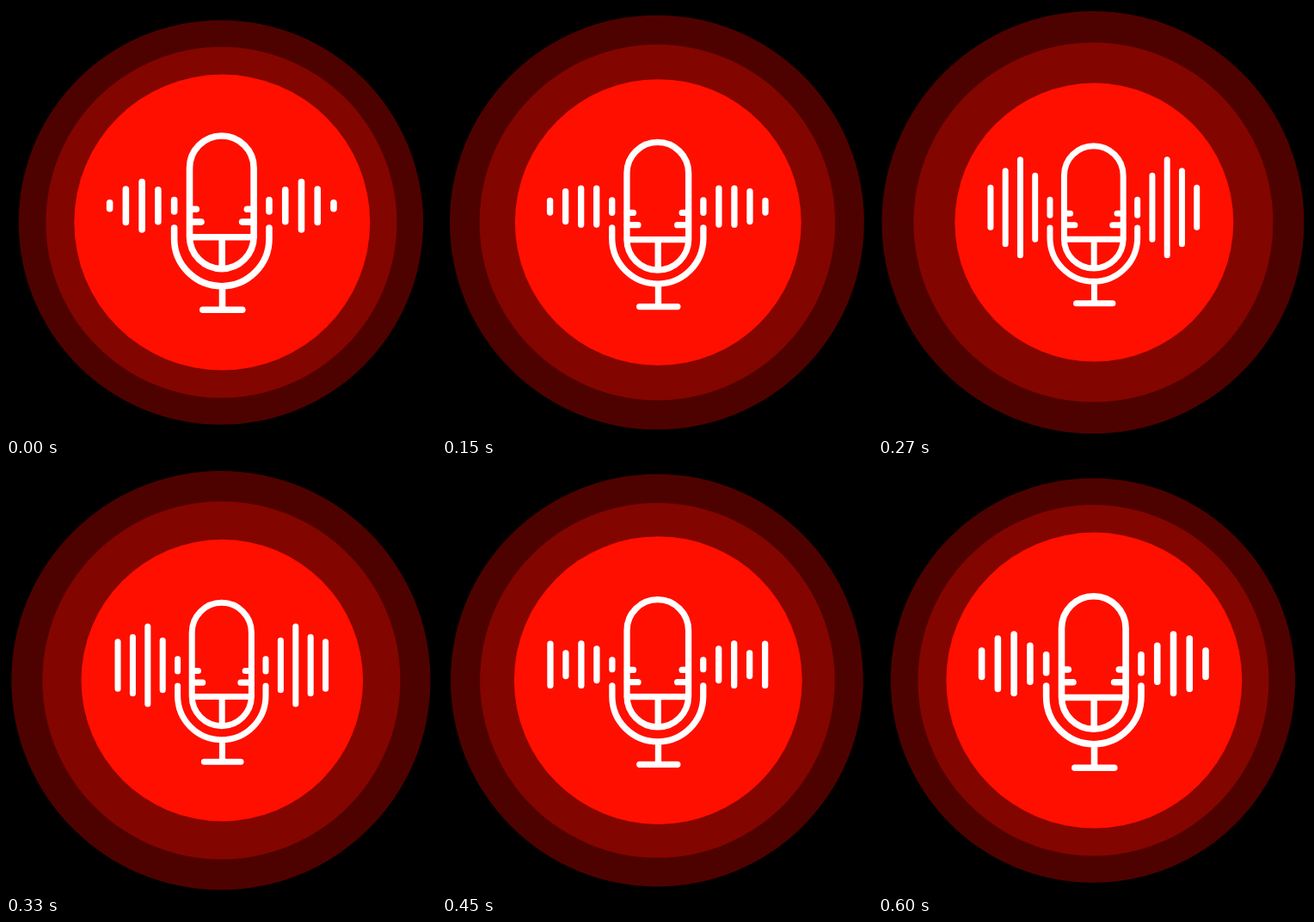
Recreate the animation shown at these times as an HTML page. Size 500 px wide and 500 px high, loop 630 ms.

```html
<!DOCTYPE html>
<html lang="en">
<head>
<meta charset="utf-8">
<title>Microphone pulse</title>
<style>
  html, body { margin: 0; width: 100%; height: 100%; overflow: hidden; background: #000; }
  svg { display: block; width: 100vw; height: 100vh; }
  .line { fill: none; stroke: #fff; stroke-width: 7.6; stroke-linecap: round; }
</style>
</head>
<body>
<svg viewBox="0 0 500 500">
  <circle id="outer" cx="249.9" cy="251.6" fill="#4e0200"/>
  <circle id="middle" cx="250.4" cy="251.6" fill="#830500"/>
  <circle id="inner" cx="251.3" cy="251.6" fill="#ff0f00"/>
  <!-- icon coordinates are relative to its scaling centre -->
  <g id="icon" class="line">
    <g id="bars"></g>
    <path d="M-55.2 1V13.5a55.2 55.2 0 0 0 110.4 0V1M.7 69V96M-22 96.3H24"/>
    <g id="capsule">
      <path d="M-37.3-66a37.3 37.3 0 0 1 74.6 0V14a37.3 37.3 0 0 1-74.6 0Z"/>
      <path d="M-37 14.5H37M.4 14.5V50"/>
      <path d="M-37-18H-29.5M-37-3.2H-23.8M37-18H29.5M37-3.2H23.8"/>
    </g>
  </g>
</svg>
<script>
const LOOP = 630, STEP = 30, PEAK = 270, END = 600;
const times = [0, 90, 210, 270, 390, 510, 600];
const shrink = [0, .21, .79, 1, .75, .27, 0];
const bounce = [-2.7, -.5, 1.4, .8, -.3, -.3, 0];
// bar lengths from the edge of the icon towards the microphone
const lengths = [
  [14.5, 23.5, 18.5, 53, 65, 43.5, 38],
  [46, 50.5, 34, 92, 46.5, 28, 66],
  [63, 39.5, 71, 118, 69, 49.5, 76],
  [44.5, 30.5, 73.5, 81, 46.5, 43, 49.5],
  [21, 16.5, 27, 25, 18.5, 18, 28.5]
];
const $ = id => document.getElementById(id);

const bars = lengths.map(() => {
  const path = document.createElementNS("http://www.w3.org/2000/svg", "path");
  return $("bars").appendChild(path);
});

function slope(v, i) {
  if (i === 0 || i === v.length - 1) {
    const j = i ? i - 1 : 0;
    return (v[j + 1] - v[j]) / (times[j + 1] - times[j]);
  }
  const a = (v[i] - v[i - 1]) / (times[i] - times[i - 1]);
  const b = (v[i + 1] - v[i]) / (times[i + 1] - times[i]);
  return a * b <= 0 ? 0 : 2 * a * b / (a + b);
}

// smooth curve through the keys, without overshoot
function curve(v, t) {
  if (t >= END) return v[v.length - 1];
  let i = 0;
  while (t >= times[i + 1]) i++;
  const d = times[i + 1] - times[i], u = (t - times[i]) / d, w = 1 - u;
  return v[i] * w * w * (1 + 2 * u) + v[i + 1] * u * u * (3 - 2 * u)
    + d * u * w * (slope(v, i) * w - slope(v, i + 1) * u);
}

function draw(t) {
  const p = t < PEAK ? t / PEAK : Math.max(0, (END - t) / (END - PEAK));
  $("outer").setAttribute("r", 235.2 + 10.3 * p);
  $("middle").setAttribute("r", 204 + 5 * p);
  $("inner").setAttribute("r", 172 - 10 * p);

  const s = 1 - .079 * curve(shrink, t);
  $("icon").setAttribute("transform", `translate(250.8 257) scale(${s})`);
  $("capsule").setAttribute("transform", `translate(0 ${curve(bounce, t) / s})`);
  bars.forEach((bar, i) => {
    const x = 130.2 - 18.75 * i;
    const h = (curve(lengths[i], t) / s - 7.6) / 2;
    bar.setAttribute("d", [-x, x].map(a => `M${a} ${-24.8 - h}V${-24.8 + h}`).join(""));
  });
}

const start = performance.now();
function tick() {
  const t = (performance.now() - start) % LOOP;
  draw(Math.floor(t / STEP) * STEP);
  requestAnimationFrame(tick);
}
tick();
</script>
</body>
</html>
```
